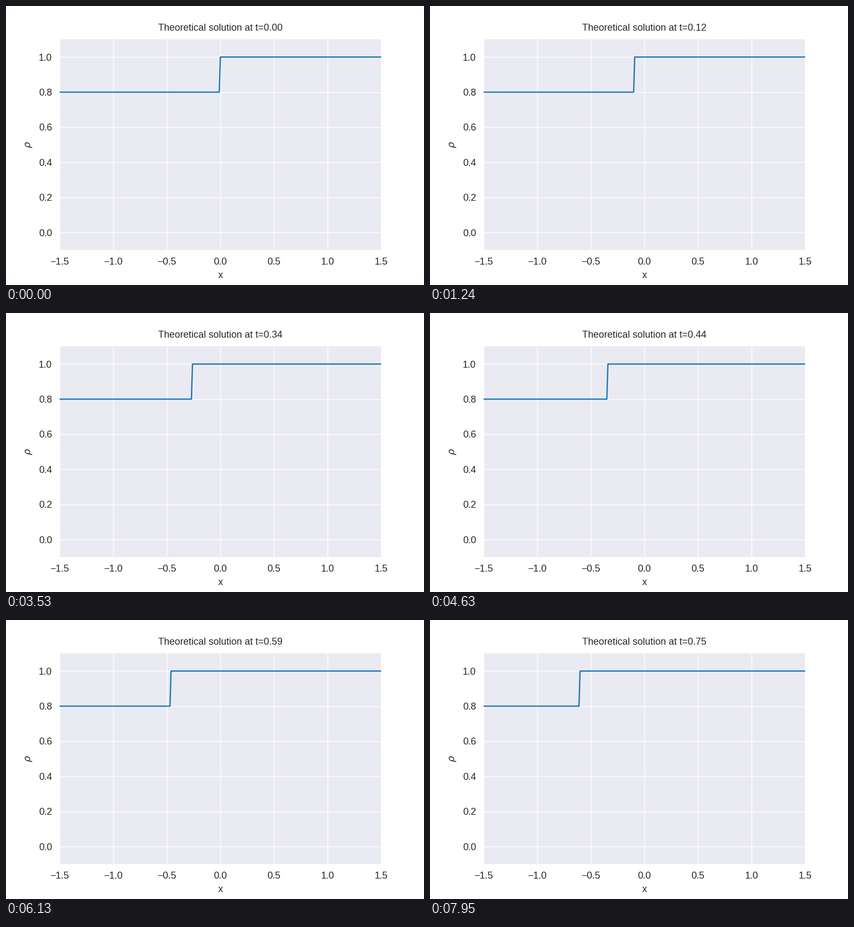
Animation of 780x520 px, one loop 8000 ms. Source, as a matplotlib script:

```python
import matplotlib.pyplot as plt
from matplotlib.animation import FuncAnimation

W, H, DPI = 780, 520, 100
LEFT, RIGHT, TOP, BOTTOM = 100, 700, 62.4, 455
TICK_MS = 10
LOOP_MS = 8000
DT = 0.001          # simulated time per tick
INK = "#262626"

plt.rcParams.update({
    "font.family": "Liberation Sans",
    "font.size": 13,
    "text.color": INK,
    "mathtext.fontset": "dejavusans",
})


def state(k):
    """Title text and shock cell at tick k; the shock moves at speed -0.8."""
    return f"Theoretical solution at t={k * DT:.2f}", 2 * k // 25


def build_timeline():
    """States that would last a single tick are held for ten."""
    line = []
    k = 0
    while len(line) < LOOP_MS // TICK_MS:
        now = state(k)
        brief = k > 0 and state(k - 1) != now != state(k + 1)
        line += [now] * (10 if brief else 1)
        k += 1
    return line[:LOOP_MS // TICK_MS]


def label(x, y, text, **kw):
    """Place text at stage pixels, y counted from the top."""
    opts = dict(ha="center", va="baseline")
    opts.update(kw)
    return fig.text(x / W, 1 - y / H, text, **opts)


def number(v):
    return f"{v:.1f}".replace("-", "\u2212")


fig = plt.figure(figsize=(W / DPI, H / DPI), dpi=DPI, facecolor="white")
ax = fig.add_axes([LEFT / W, 1 - BOTTOM / H,
                   (RIGHT - LEFT) / W, (BOTTOM - TOP) / H],
                  facecolor="#EAEAF2")
ax.set(xlim=(-1.5, 1.5), ylim=(-0.1, 1.1))
ax.xaxis.set_visible(False)
ax.yaxis.set_visible(False)
for spine in ax.spines.values():
    spine.set_visible(False)

for i in range(7):
    v = -1.5 + 0.5 * i
    ax.axvline(v, color="white", lw=1, zorder=1)
    label(LEFT + 100 * i, 482, number(v))

for i in range(6):
    v = 0.2 * i
    y = BOTTOM - (v + 0.1) / 1.2 * (BOTTOM - TOP)
    ax.axhline(v, color="white", lw=1, zorder=1)
    label(86.1, y, number(v), ha="right", va="center_baseline")

label(400, 507, "x")
label(46, (TOP + BOTTOM) / 2, r"$\rho$", rotation=90, rotation_mode="anchor")
title = label(400, 45.7, "")
curve, = ax.plot([], [], color="#1f77b4", lw=1.75, zorder=2,
                 solid_capstyle="round")

timeline = build_timeline()


def update(i):
    text, cell = timeline[i]
    title.set_text(text)
    x = -0.01 * cell
    curve.set_data([-1.5, x - 0.01, x, 1.5], [0.8, 0.8, 1, 1])
    return title, curve


anim = FuncAnimation(fig, update, frames=len(timeline), interval=TICK_MS,
                     repeat=True, repeat_delay=0, blit=False)
plt.show()
```
